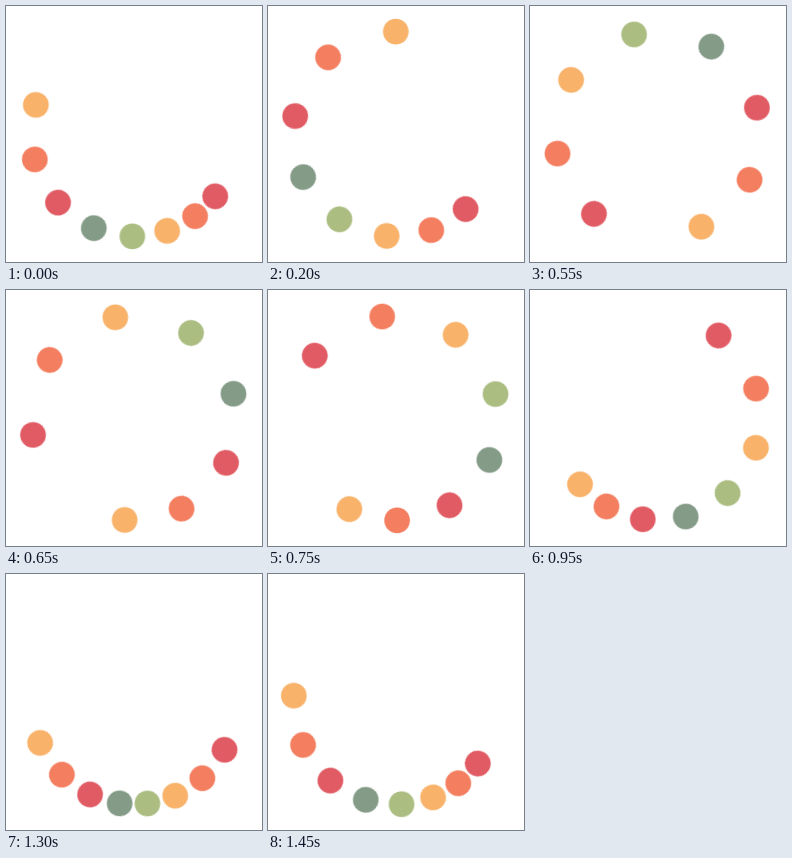
An HTML page for the animation above (1.5 s loop, 256x256 px).

```html
<!DOCTYPE html>
<html lang="en">
<head>
<meta charset="utf-8">
<title>Loader</title>
<style>
  html, body { margin: 0; width: 100%; height: 100%; overflow: hidden; background: #fff; }
  svg { display: block; width: 100vw; height: 100vh; }
</style>
</head>
<body>
<svg id="stage" viewBox="-128 -128 256 256"></svg>
<script>
  const LOOP = 1500, STEPS = 30, ORBIT = 102.4, RADIUS = 12.8;
  const SPREAD = 15; // degrees between neighbouring balls at rest
  const LAG = 1 / 24; // share of the loop between neighbouring balls
  const COLORS = ['#e15b64', '#f47e60', '#f8b26a', '#abbd81', '#849b87',
                  '#e15b64', '#f47e60', '#f8b26a'];

  // cubic-bezier(.5, 0, .5, 1), solved by bisection
  function ease(x) {
    let lo = 0, hi = 1;
    for (let i = 0; i < 30; i++) {
      const s = (lo + hi) / 2;
      if (1.5 * s * (1 - s) + s ** 3 < x) lo = s; else hi = s;
    }
    return lo * lo * (3 - 2 * lo);
  }

  function angle(index, time) {
    const rest = (index - (COLORS.length - 1) / 2) * SPREAD;
    return rest + 360 * ease((time + index * LAG) % 1);
  }

  const stage = document.getElementById('stage');
  COLORS.forEach((color, index) => {
    const ball = document.createElementNS('http://www.w3.org/2000/svg', 'circle');
    ball.setAttribute('cy', ORBIT);
    ball.setAttribute('r', RADIUS);
    ball.setAttribute('fill', color);
    stage.append(ball);

    const frames = Array.from({ length: STEPS + 1 }, (_, i) => ({
      offset: i / STEPS,
      transform: `rotate(${angle(index, i / STEPS).toFixed(3)}deg)`,
      easing: 'step-end'
    }));
    ball.animate(frames, { duration: LOOP, iterations: Infinity });
  });
</script>
</body>
</html>
```
